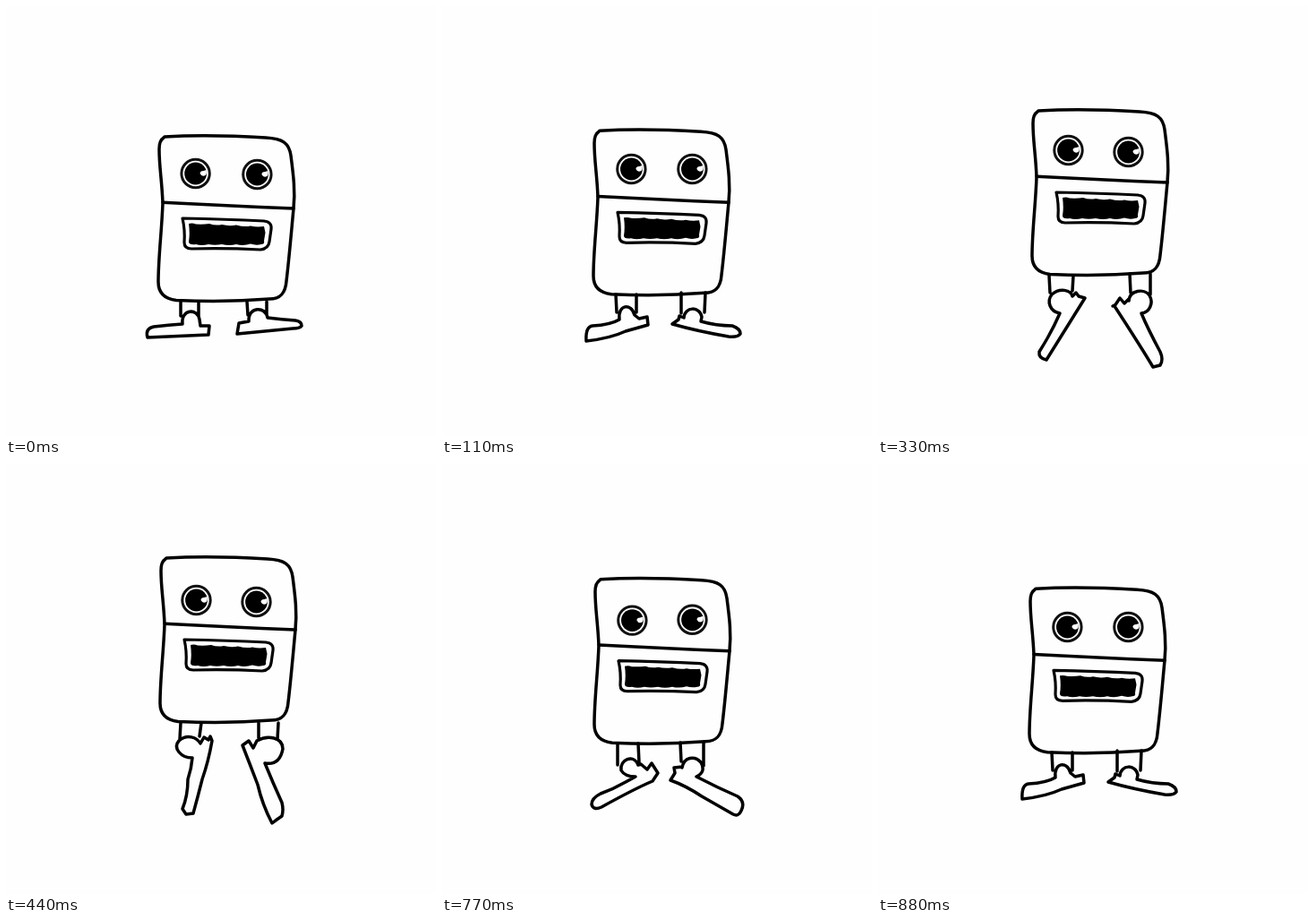
These frames come from a looping animation (480x480 px, 990 ms). An HTML page:

```html
<!DOCTYPE html>
<html lang="en">
<head>
<meta charset="utf-8">
<title>Jumping box robot</title>
<style>
  html, body { margin: 0; width: 100%; height: 100%; overflow: hidden; background: #fefefe; }
  svg { display: block; width: 100%; height: 100%; }
  .ink { fill: none; stroke: #000; stroke-width: 3.5; stroke-linecap: round; stroke-linejoin: round; }
  .legs { display: none; }
</style>
</head>
<body>
<svg viewBox="0 0 480 480">
  <defs>
    <g id="eye">
      <circle r="15.7" fill="#fff" stroke="#111" stroke-width="3"/>
      <circle r="12.4"/>
      <path d="M5 0Q5-3 9-3L12-4Q13 0 11 2Q7 4 5 0Z" fill="#fff"/>
    </g>
  </defs>

  <g id="body" class="ink">
    <path d="M174 149L177 146Q225 143 290 147C309 148 316 153 318 167C321 190 323 207 321 226C318 258 316 282 313 307C312 320 307 327 294 327Q245 331 190 328.5Q170 326 170 308C170 280 174 250 175 220C174 194 171 180 171 160Q171 150 176 147"/>
    <path d="M175 219.2Q245 223 321 226"/>
    <path stroke-width="3.2" d="M197 237Q245 238 288 240Q297 241 296 249L294 263Q293 271 284 272Q245 270 207 271Q199 271 199 264Q200 250 197 237Z"/>
    <path fill="#000" stroke="none" d="M204 243Q208 242 212 243.5Q220 244 227 243Q234 245.5 241 244Q249 246 257 244.5Q266 247 273 245.5Q280 247 288 246L289.5 253L288 262Q289 266 285 266Q279 267.5 273 265.5Q265 268 257 266Q249 268 241 266Q233 267.5 226 266Q218 268 212 266Q204 267 204 263Q205.500 254 204 243Z"/>
  </g>
  <use id="leftEye" href="#eye"/>
  <use id="rightEye" href="#eye"/>

  <g class="legs ink">
    <path d="M195 330L195 346M215 330L215 346M197 355C195 338 214 337 216 350L217 357L227 357L226 367L158 370Q155 360 165 358Q182 356 197 355"/>
    <path d="M269 330L270 345M291 330L291 345M271 352C270 335 290 335 292 348Q308 350 323 351Q330 352 330 357Q328 360 320 360L258 366L260 354L271 352"/>
  </g>
  <g class="legs ink">
    <path d="M194 322L195 342M217 322L217 342M198 350C196 333 211 331 215 345L220 349L229 347L230 356L205 363Q188 371 161 374Q160 358 168 357Q188 356 198 350"/>
    <path d="M267 320L267 343M294 320L293 342M270 348C271 335 288 335 290 347L289 352Q306 357 324 357Q333 360 333 366Q330 370 320 369Q285 363 257 355L264 350L265 346L270 348"/>
  </g>
  <g class="legs ink">
    <path d="M196 312L196 336M219 312L220 333M216 349Q204 349 200 342C198 330 214 323 219 336L222 335L229 341L234 334L241 345L235 354Q214 363 178 383Q169 387 167 380Q167 373 177 368Q191 363 205 355Z"/>
    <path d="M266 311L267 332M292 311L292 337M268 339C270 327 282 325 289 333Q295 344 284 349Q307 361 330 371Q339 377 334 387Q331 394 325 391L290 371Q272 359 255 353L260 345L259 339L268 338"/>
  </g>
  <g class="legs ink">
    <path d="M191 301L192 320M218 301L217 318M203 343C192 341 188 330 194 322C203 314 215 317 217 324L221 320L224 324L231 326L188 395Q179 393 180 386Q185 378 189 371Q197 357 203 343"/>
    <path d="M281 299L282 320M304 299L304 322M280 329C281 317 297 315 303 323C308 332 303 342 294 343Q301 360 315 386Q319 395 315 401L307 403Q292 378 264 335L270 326L275 332L280 327M262 335L264 334"/>
  </g>
  <g class="legs ink">
    <path d="M195 289L194 307M218 289L216 304M208 328C195 328 186 317 193 309C202 301 213 305 217 312L221 305L226 308L228 304L230 309Q226 332 219 352Q214 372 209 390L201 391L197 385Q203 370 203 352Q207 340 208 328"/>
    <path d="M282 289L282 306M304 289L303 307M276 317L280 309C292 302 309 305 309 318C307 329 301 336 289 334Q298 356 308 378Q310 386 308 393Q302 397 297 401Q286 380 281 358Q273 337 264 314L271 309L276 317"/>
  </g>
</svg>
<script>
  const STEP = 110;
  const SEQUENCE = [0, 1, 2, 3, 4, 4, 3, 2, 1];

  // Body offset and eye centres, from standing to the top of the jump.
  const POSES = [
    { body: [0, 0],      left: [211.6, 187],   right: [280.4, 188] },
    { body: [-1, -6.7],  left: [211.4, 182],   right: [279.4, 182] },
    { body: [0, -17.3],  left: [212.4, 174.6], right: [279.5, 173.8] },
    { body: [2, -29],    left: [212.5, 161],   right: [279.5, 163] },
    { body: [2, -41],    left: [212.5, 152],   right: [279.5, 154] }
  ];

  const byId = id => document.getElementById(id);
  const legs = document.querySelectorAll('.legs');
  const move = (id, [x, y]) => byId(id).setAttribute('transform', `translate(${x} ${y})`);

  function showPose(index) {
    const pose = POSES[index];
    move('body', pose.body);
    move('leftEye', pose.left);
    move('rightEye', pose.right);
    legs.forEach((pair, i) => pair.style.display = i === index ? 'inline' : 'none');
  }

  const start = performance.now();
  function draw(now) {
    const step = Math.floor(Math.max(0, now - start) / STEP);
    showPose(SEQUENCE[step % SEQUENCE.length]);
    requestAnimationFrame(draw);
  }
  draw(start);
</script>
</body>
</html>
```
